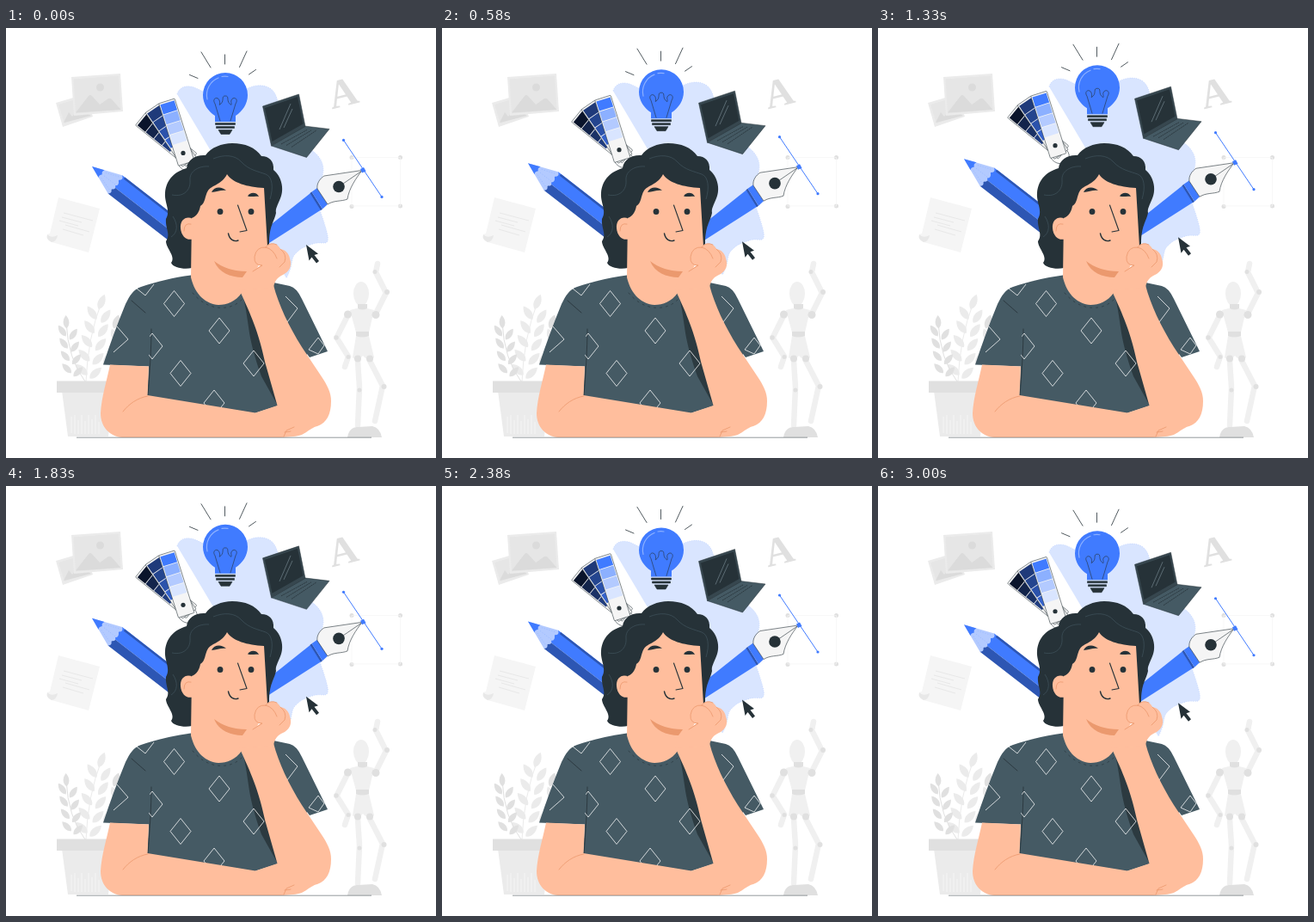
An HTML page that plays this animation: 500 by 500 pixels, repeating every 3040 ms.

```html
<!DOCTYPE html>
<html lang="en">
<head>
<meta charset="utf-8">
<title>Design thinking</title>
<style>
html, body { margin: 0; width: 100%; height: 100%; overflow: hidden; background: #fff }
svg { display: block; width: 100vw; height: 100vh }
.line { fill: none; stroke: #263238; stroke-linecap: round; stroke-linejoin: round }
.limb { fill: none; stroke: #f0f0f0; stroke-width: 6.500; stroke-linecap: round }
</style>
</head>
<body>
<svg viewBox="0 0 500 500">
  <!-- pictures, letter, paper -->
  <path fill="#ebebeb" d="M58 87 92 77 101 103 66 115Z"/>
  <path fill="#e6e6e6" d="M61 89 91 80 98 101 68 111Z"/>
  <path fill="#dbdbdb" d="M67 110 73 98 77 103 85 94 99 102Z"/>
  <path fill="#ebebeb" d="M76 57 133 53 136 97 79 102Z"/>
  <path fill="#e6e6e6" d="M78.500 59.500 131 55.500 133.500 95 81 99.500Z"/>
  <path fill="#dbdbdb" d="M81 98.500 96 79Q98 77 100 79L109 89 119 82Q121 81 123 83L133.500 95Z"/>
  <circle cx="109.500" cy="69" r="4.500" fill="#dbdbdb"/>
  <text transform="translate(395.500 90.500) rotate(-14)" text-anchor="middle" font-family="'Liberation Serif', serif" font-weight="700" font-size="47" fill="#e0e0e0">A</text>
  <path fill="#f5f5f5" d="M61 197 109 210 96 261 53 249Q47 246 48 240L51 239Z"/>
  <path fill="#e8e8e8" d="M48 240Q52 245 60 241 59 248 53 249 46 246 48 240Z"/>
  <path fill="none" stroke="#e8e8e8" d="M67 215 101 224M65 220 88 226M69 229 97 237M62 224 84 230M66 234 90 241"/>
  <!-- plant -->
  <g id="plant"></g>
  <path fill="#ebebeb" d="M65 422H125L119 475H72Z"/>
  <path fill="#e0e0e0" d="M59 410.500H126V424H59Z"/>
  <path stroke="#f5f5f5" fill="none" d="M76 452V471M80 450V472M84 456V472M88 450V472M92 457V472M96 450V472M100 455V472M104 450V472M108 458V472"/>
  <!-- mannequin -->
  <path class="limb" d="M397 335 385 359M385 361 398 382 394 394M430 332 442 308 430 284 432 274M409 387 411 418 409 462M423 387 438 416 429 457"/>
  <ellipse cx="413" cy="309" rx="9" ry="14" fill="#f0f0f0"/>
  <path fill="#f0f0f0" d="M400 328Q414 323 428 328L422 354H407ZM407 358H422L428 383Q422 389 415 381 408 389 403 383Z"/>
  <path fill="#e0e0e0" d="M409 321H420V326Q414 329 409 326ZM407 353H422V358Q414 361 407 358ZM397 476Q399 464 409 464L426 463Q435 465 437 476Z"/>
  <g fill="#e0e0e0">
    <circle cx="397.500" cy="333" r="4.500"/><circle cx="430" cy="333.500" r="4.500"/>
    <circle cx="384" cy="360" r="2.800"/><circle cx="398" cy="382.500" r="2.500"/>
    <circle cx="443" cy="307" r="3"/><circle cx="429" cy="283.500" r="2.500"/>
    <circle cx="409" cy="384.500" r="4"/><circle cx="423" cy="384.500" r="4"/>
    <circle cx="411" cy="421" r="2.500"/><circle cx="439.500" cy="417" r="3"/>
    <circle cx="402" cy="150.500" r="2.500"/><circle cx="458.500" cy="150.500" r="2.500"/>
    <circle cx="402" cy="207.500" r="2.500"/><circle cx="458.500" cy="207" r="2.500"/>
  </g>
  <path fill="none" stroke="#f5f5f5" stroke-width=".7" d="M402 150.500H458.500V207H402Z"/>

  <g id="ideas">
    <path fill="#d9e5ff" stroke="#b3caff" stroke-width=".6" stroke-dasharray="1 1.500" d="M199 77C202 67 212 66 221 70S240 82 255 80 280 68 292 67 312 71 315 82 338 92 345 108 345 135 354 141 372 157 368 172 367 190 364 198 368 217 373 237 368 247 357 251 344 255 337 262 335 274 326 291 316 298H192C189 286 190 273 183 266 164 256 146 254 139 243 136 228 147 214 146 201 140 189 142 174 133 160 141 154 149 150 157 145 153 133 160 127 180 120 195 107 196 88 199 77Z"/>
    <!-- pencil -->
    <g transform="translate(100 161) rotate(37.800)">
      <path fill="#407bff" d="M34-13.500H130V3H34Z"/>
      <path fill="#2d56b3" d="M34 3H130V13.500H34ZM38-13.500H130V-11H38Z"/>
      <path fill="#b3caff" d="M0 0 34-13.500Q39-10 34-6.500 39-2 35 1 39 4 34 7 38 11 34 13.500Z"/>
      <path fill="#407bff" d="M0 0 14-5.600Q12-2 15 0 12 3 14 5.600Z"/>
      <path fill="none" stroke="#8cb0ff" stroke-width=".6" stroke-dasharray="1 2" d="M17-4 33-10M18 0H35M17 4 33 9"/>
    </g>
    <!-- fountain pen -->
    <path fill="#407bff" d="M295 239 354 192 367 211 295 257Z"/>
    <path fill="#2d56b3" d="M353.500 192 355.500 190.500 368 210.500 366 212Z"/>
    <path fill="#407bff" d="M355.500 190.500 362 186 374 205 368 210.500Z"/>
    <path fill="#f5f5f5" stroke="#263238" stroke-width=".6" d="M362 187C361 181 365 175 370 172L414 165.500C407 175 399 186 397 199 390 202 382 200 374 205Z"/>
    <path class="line" stroke-width=".6" d="M387 184.500 414 166"/>
    <circle cx="387" cy="184.500" r="6.800" fill="#263238"/>
    <path stroke="#407bff" d="M392.500 130.500 437 196.500"/>
    <g fill="#407bff">
      <circle cx="392.500" cy="130.500" r="1.600"/><circle cx="437" cy="196.500" r="1.600"/>
      <path d="M412 164 416 162 418.500 166.500 414 168.500Z"/>
    </g>
    <!-- pointer -->
    <path fill="#263238" d="M349 252 363 262.500 358.500 264 364 271 361 273.500 355.500 266.500 352.500 270.500Z"/>
    <!-- laptop -->
    <path fill="#455a64" stroke="#263238" stroke-width=".5" d="M308.500 137 347 114 376 117.500 349.500 150.500Z"/>
    <path fill="none" stroke="#263238" stroke-width=".8" stroke-dasharray="2 .7" d="M320 135 350 118.500M326 136.500 355 119M332 138.500 361 119"/>
    <path fill="#37474f" stroke="#263238" stroke-width=".5" stroke-linejoin="round" d="M298.500 91 340.500 77 348 114.500 308.500 137Z"/>
    <path fill="#263238" d="M301 93 339 80 345.500 111.500 309.500 132Z"/>
    <path stroke="#90a4ae" stroke-width=".5" d="M318 118 331 88M323 116 333 94"/>
    <!-- colour swatches -->
    <path class="line" stroke-width=".6" d="M206 145.500C196 151 199 163 209 166S225 160 221 153 212 146 206 145.500"/>
    <g id="fan" transform="translate(206 145.500)"></g>
    <circle cx="206" cy="145.500" r="2.600" fill="#263238"/>
    <!-- bulb -->
    <path fill="#407bff" d="M243 109V102C235 97 229 88 229 78A26 26 0 0 1 281 78C281 88 275 97 267 102V109Z"/>
    <path fill="none" stroke="#8cb0ff" stroke-width="1.200" stroke-linecap="round" d="M234 83A21.500 21.500 0 0 1 247 58M251 56.500A21 21 0 0 1 258 56.500"/>
    <path class="line" stroke-width=".6" d="M249 108 243 88C239 82 246 79 248 84S246 91 250 88C254 84 250 79 255 79S256 84 260 88 261 86 262 84C264 79 271 82 267 88L261 108"/>
    <path fill="#263238" stroke="#263238" stroke-width=".6" stroke-linejoin="round" d="M243.500 110.500H266.500V112.500H243.500ZM244.500 114.500H265.500V116.500H244.500ZM247 118.500H263L260 123.500H250Z"/>
    <path class="line" stroke-width=".8" d="M227 28 238 46M254.500 31V42M280 27 271.500 45.500M213.500 54.500 223 58.500M290.500 48.500 282.500 54"/>
  </g>

  <!-- person -->
  <path fill="#263238" d="M216 279C208 281 194 279 192 273 198 266 186 256 186 248 192 240 185 233 186 222 192 213 184 203 185 192 186 179 193 168 210 163 211 153 221 147 232 148 238 139 251 134 263 134 278 134 290 139 297 149 306 149 312 155 311 165 320 172 324 187 319 198 316 206 313 210 314 215 312 225 306 230 306 251L290 272H216Z"/>
  <path fill="none" stroke="#455a64" stroke-width=".6" d="M193 194C207 197 215 188 214 177S225 160 236 161M241 152C253 147 266 147 274 156S294 167 302 170 311 186 307 199M192 243C200 238 200 228 194 219"/>
  <path fill="#455a64" d="M215 287.500C195 290 175 295 157 301 148 304 144 311 139 321 130 343 121 367 113 391.500L166 393.500 164 428 289 448 317 439 350 379 353 383 374 376 344 315Q338 302 330 300L311 296Z"/>
  <path fill="#263238" fill-opacity=".8" d="M273 303C280 325 281 345 284 360S291 388 297 405L316 439 340 380 290 300Z"/>
  <path class="line" stroke-width=".8" d="M146 317 162 331M169 350C169 372 167 404 165 427"/>
  <clipPath id="torso"><path d="M170 294H273L285 331 320 440 289 448 164 428Z"/></clipPath>
  <g fill="none" stroke="#fff" stroke-width=".75">
    <g id="diamonds" clip-path="url(#torso)"></g>
    <path d="M129 347 142 362 125 377M152 303 162 311 172 298M325 312 339 326 327 342M352 374 363 360 370 369 363 379Z"/>
  </g>
  <g fill="#ffbe9d">
    <path d="M121 391.500 166 393.500 164.500 427 290 447.500 315.500 439 301 388C294 354 284 332 273 308 269 302 274 292 287 285L311 299C317 322 329 347 344 371L366 404C374 416 378 424 378 434 378 449 373 459 362 463 351 466 349 474 334 475L320 476H135C121 475 110 464 110 448 111 429 117 411 121 391.500Z"/>
    <path d="M216 221C222 219 225 213 226 207 232 204 231 195 235 189 239 183 251 182 257 170 263 180 281 185 300 186L304 254 289 286 274 308C267 318 257 322 247 322 233 321 220 311 215 290Z"/>
    <path d="M217 222C210 218 202 223 203 233S211 248 218 245Z"/>
  </g>
  <path fill="#eb996e" d="M242 271C252 279 265 283 280 283L275 290C261 290 247 284 242 271Z"/>
  <path fill="#ffbe9d" d="M289 267C287 259 293 254 302 255 305 249 316 249 319 257 325 258 329 262 330 268 333 276 330 283 322 287 315 290 312 295 311 302L272 305C270 296 277 289 287 283L296 276C291 276 288 272 289 267Z"/>
  <g fill="none" stroke="#eb996e" stroke-width=".8" stroke-linecap="round">
    <path d="M287 283 298 276Q288 276 289 266 291 254 302 255M302 255Q311 257 315 268M319 257Q327 263 324 272L318 278M302 255Q307 248 315 252M207 236Q207 226 215 228"/>
    <path d="M136 446C143 437 153 430 165 428M323 475 326 468 335 464M324 470 331 469"/>
  </g>
  <g class="line">
    <path stroke-width="1.100" d="M269.500 206 280 235.500 272 237"/>
    <path stroke-width="1.400" d="M258.500 239C260 246 265 249 270 247"/>
    <path stroke-width=".6" stroke-dasharray="2 5" d="M217 308C234 329 260 330 274 316"/>
  </g>
  <g fill="#263238">
    <path d="M239 191C242 184 251 184 256 189 250 188 245 191 239 191ZM281 195.500C284 190 292 191 294 196 289 195 286 197 281 195.500Z"/>
    <ellipse cx="249" cy="213.500" rx="3.400" ry="3.600"/>
    <ellipse cx="285" cy="213.500" rx="3.400" ry="3.600"/>
  </g>
  <path d="M82 476.200H425" stroke="#263238" stroke-width=".5"/>
</svg>
<script>
const el = id => document.getElementById(id);

const leaf = (x, y, angle, size, fill) =>
  `<path transform="translate(${x} ${y}) rotate(${angle}) scale(${size})" fill="${fill}" d="M0 8C-5 4-5-3 0-9 5-3 5 4 0 8Z"/>`;

// Leaf pairs run down a leaning stem from its tip.
function sprig(x, y, dx, dy, pairs, size, fill, stem) {
  let out = `<path fill="none" stroke="${fill}" d="${stem}"/>` + leaf(x, y, dx < 0 ? 22 : -3, size, fill);
  for (let i = 0; i < pairs; i++) {
    const px = x + dx * (i + 1), py = y + dy * (i + 1);
    out += leaf(px - 7 * size, py - 4, -35 - 3 * i, size, fill) + leaf(px + 7 * size, py, 35 + 3 * i, size, fill);
  }
  return out;
}
el('plant').innerHTML =
  sprig(111, 319, -3, 16.5, 5, 1.1, '#ebebeb', 'M111 319Q95 360 93 411') +
  sprig(70, 342, 1.8, 14.5, 4, .9, '#e0e0e0', 'M70 342Q72 385 92 411') +
  leaf(128, 342, 20, 1, '#e0e0e0') + leaf(126, 358, -20, 1, '#ebebeb') + leaf(118, 384, 35, 1, '#ebebeb');

const strips = [
  [-51, '#0a142b', '#13244b', '#1a3166', '#203d80'],
  [-34.5, '#1f3a7a', '#24458f', '#2b52ab', '#3563cc'],
  [-17.5, '#407bff', '#8cb0ff', '#b3caff', '#d9e5ff']
];
el('fan').innerHTML = strips.map(([angle, ...colors]) =>
  `<g transform="rotate(${angle})"><rect x="-9.7" y="-63.5" width="19.4" height="76" rx="1" fill="#f5f5f5" stroke="#263238" stroke-width=".5"/>` +
  colors.map((c, i) => `<rect x="-8.5" y="${-61.5 + i * 12.4}" width="17" height="11.6" fill="${c}"/>`).join('') + '</g>').join('');

el('diamonds').innerHTML = [[195.5, 320.5], [248, 352], [203, 401.5], [288, 390], [170, 370], [242, 436]]
  .map(([x, y]) => `<path d="M${x} ${y - 15} ${x + 12} ${y} ${x} ${y + 15} ${x - 12} ${y}Z"/>`).join('');

// Linear float: 10 px up and back.
const LOOP = 3040, RISE = 10, LEAD = 65;
const start = performance.now();
function draw() {
  const p = ((performance.now() - start + LEAD) % LOOP) / LOOP;
  const lift = RISE * (1 - Math.abs(1 - 2 * p));
  el('ideas').setAttribute('transform', `translate(0 ${0.4 - lift})`);
  requestAnimationFrame(draw);
}
draw();
</script>
</body>
</html>
```
